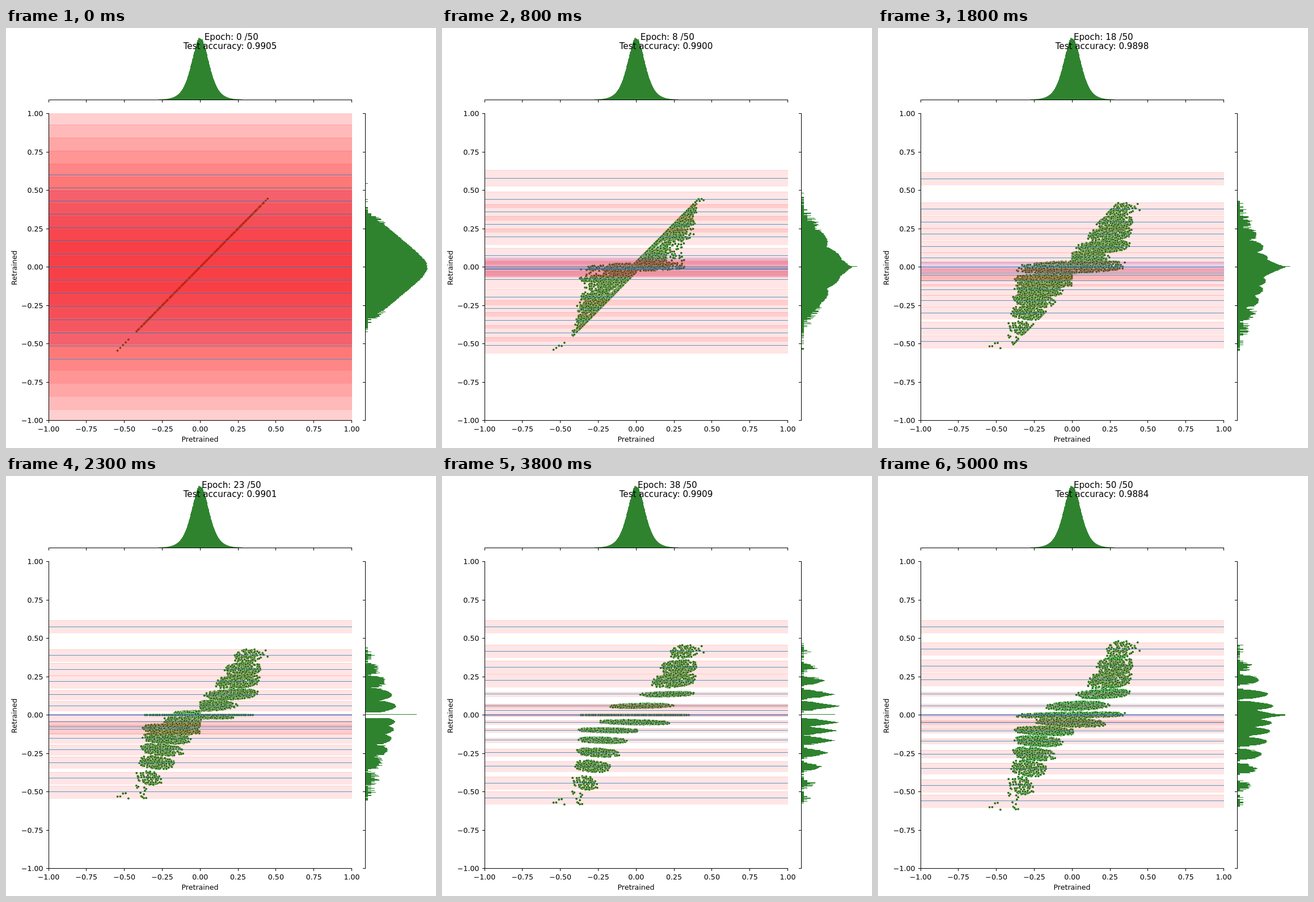
An HTML page with a canvas that plays this animation: 758x739 px, repeating every 5100 ms.

```html
<!DOCTYPE html>
<html lang="en">
<head>
<meta charset="utf-8">
<title>Weight clustering</title>
<style>
html, body { margin: 0; width: 100%; height: 100%; overflow: hidden; background: #fff; }
canvas { display: block; width: 758px; height: 739px; }
</style>
</head>
<body>
<canvas id="plot" width="758" height="739"></canvas>
<script>
const ctx = document.getElementById('plot').getContext('2d');
const STEP = 100, LAST = 50;
const FONT = '"DejaVu Sans", sans-serif';
const GREEN = '#2f832f';
const ZERO = 6, ROAMER = 7, SNAP = 20;

// where the cluster centres end up
const settled = [.575, .43, .32, .23, .137, .06, 0, 0,
  -.049, -.104, -.171, -.254, -.347, -.46, -.561];
// epoch, accuracy
const scores = [[0, 9905], [4, 9903], [14, 9896], [23, 9901], [30, 9906], [38, 9909], [50, 9884]];

const clamp = (v, lo = 0, hi = 1) => Math.min(hi, Math.max(lo, v));
const ramp = (v, a, b) => clamp((v - a) / (b - a));
const mix = (a, b, t) => a + (b - a) * t;
const X = v => 342.25 + 267.25 * v;
const Y = v => 420.5 - 270 * v;

function generator(seed) {
  return () => {
    seed = seed + 0x6D2B79F5 | 0;
    let t = Math.imul(seed ^ seed >>> 15, 1 | seed);
    t = t + Math.imul(t ^ t >>> 7, 61 | t) ^ t;
    return ((t ^ t >>> 14) >>> 0) / 4294967296;
  };
}

// Each cluster gathers weights from a range around its centre.
function makePoints() {
  const rnd = generator(11);
  const list = [];
  const add = (k, x, off) => list.push({
    k, x, lag: rnd(), order: rnd(),
    noise: 1.1 * (2 * rnd() - 1) * Math.sqrt(1 - .85 * off * off) + .3 * off
  });
  settled.forEach((c, k) => {
    if (k === 0 || k === ROAMER) return;
    const size = Math.abs(c), side = c < 0 ? -1 : 1;
    const near = .66 * size - .06 - .32 * Math.exp(-((c / .07) ** 2));
    const far = size > 0 && size < .08 ? .25 : .37 + .12 * size;
    const count = 950 * Math.pow(1 - size / .6, 1.6);
    for (let i = 0; i < count; i++) {
      const off = rnd() + rnd() - 1;
      add(k, side * ((near + far) / 2 + off * (far - near) / 2), off);
    }
  });
  for (let i = 0; i < 5; i++) add(14, -.545 + .018 * i, -.6);
  for (let i = 0; i < 3; i++) add(1, .445 - .013 * i, .6);
  return list.sort((a, b) => a.order - b.order);
}
const points = makePoints();

// An even grid is first drawn towards zero, then settles and spreads outwards.
function center(k, e) {
  const grid = .6 - k * .6 / 7;
  const pulled = grid * mix(.91, .97, ramp(grid, -.2, .6)) * ramp(Math.abs(grid), .09, .25);
  const early = mix(grid, pulled, ramp(e, 0, 4));
  const end = settled[k];
  const shrink = k === 0 ? 0 : end > 0 ? .14 * Math.min(1, end / .43) : .155;
  const late = k === ROAMER
    ? -.025 - .055 * Math.cos(Math.PI * (e - 22) / 17) * ramp(e, 10, 22)
    : end * (1 - shrink * Math.pow((LAST - e) / 36, 1.3));
  return mix(early, late, ramp(e, 4, 14));
}

function halfWidth(k, c, e) {
  if (k === ZERO && e >= SNAP) return .004;
  const early = .04 + .46 * Math.pow(.635, e);
  if (k === ROAMER) return early;
  const late = clamp(Math.abs(c) * .1 + (c > .2 ? .03 : 0), .013, .041);
  return mix(early, late, ramp(e, 14, 38));
}

function clusterState(e) {
  return settled.map((_, k) => {
    const c = center(k, e);
    return { c, h: halfWidth(k, c, e) };
  });
}

function pointY(p, e, state) {
  const { c, h } = state[p.k];
  const widen = .012 * ramp(e, 42, 50);
  const spread = p.k === ZERO && e >= SNAP
    ? 1.3 * widen
    : (Math.min(.042, h) + widen) * clamp(e / 14);
  const side = Math.sign(p.x);
  let goal = (c + spread * p.noise) * side;
  if (goal < 0 && p.k !== ZERO) goal *= ramp(e, 20, 30);
  const reach = e < 14 ? .004 * e : .056 + (e - 14) * .015;
  goal = Math.min(goal, Math.abs(p.x) + reach) * side;
  return mix(p.x, goal, Math.pow(ramp(e, 0, 4 + 12 * p.lag), 1 + p.lag));
}

function dot(x, y, r, color) {
  ctx.fillStyle = color;
  ctx.beginPath();
  ctx.arc(x, y, r, 0, 7);
  ctx.fill();
}

function drawCloud(e, state) {
  for (const p of points) {
    const x = X(p.x), y = Y(pointY(p, e, state));
    dot(x, y, 2.2, '#fff');
    dot(x, y, 1.88, '#0b780b');
  }
}

function drawBand(c, h, color) {
  const top = Math.round(Y(c + h)), bottom = Math.round(Y(c - h));
  ctx.fillStyle = ctx.strokeStyle = color;
  ctx.fillRect(75, top, 535, bottom - top);
  ctx.strokeRect(74.5, top + .5, 536, bottom - top);
}

function drawBands(e, state) {
  ctx.save();
  ctx.beginPath();
  ctx.rect(75, 150, 535, 541);
  ctx.clip();
  ctx.lineWidth = 1;
  drawBand(0, e >= SNAP ? .005 : .03 + .47 * Math.pow(.71, e), 'rgba(0,0,255,.1)');
  for (const { c, h } of state) drawBand(c, h, 'rgba(255,0,0,.1)');
  ctx.fillStyle = 'rgba(31,119,180,.72)';
  for (const { c } of state) ctx.fillRect(75, Math.floor(Y(c)), 535, 1);
  ctx.fillRect(75, 420, 535, 1);
  ctx.restore();
}

function drawTopBars() {
  const rnd = generator(5);
  ctx.fillStyle = GREEN;
  for (let x = 200; x < 485; x++) {
    const f = Math.pow(Math.cosh((x - 342) / 20.5), -2);
    const h = 109 * f + (rnd() - .5) * 4 * f;
    if (h > .3) ctx.fillRect(x, 126 - h, 1, h);
  }
}

const lobe = (y, c, height, w, power) => height * (1 - Math.pow(Math.abs(y - c) / w, power));

// log-scaled count of weights at value y
function sideHeight(y, e, state) {
  const bell = 110 - 48 * Math.log10(Math.cosh(y / .064));
  const whole = mix(bell, 91 - 225 * Math.abs(y), ramp(e, 0, 4));
  const sharp = ramp(e, 28, 38) - ramp(e, 38, 48);
  const power = mix(2.2, 1, sharp);
  const width = .035 + .022 * ramp(38 - e, 0, 20);
  const scale = mix(.8, 1, ramp(e, 20, 32)) + .12 * sharp;
  let best = -30;
  state.forEach(({ c }, k) => {
    if (k === 0 || k === ZERO || k === ROAMER) return;
    const height = c > 0 ? 66 * Math.exp(-((c / .31) ** 2)) : 62 * Math.exp(-((c / .42) ** 2));
    best = Math.max(best, lobe(y, c, height * scale, width + .02 * Math.min(.4, Math.abs(c)), power));
  });
  if (e < SNAP) best = Math.max(best, lobe(y, 0, 86, .13, .9));
  else if (Math.abs(y) < .018 && e < 42) best = -30;
  if (e > 42) best = Math.max(best, lobe(y, 0, 95, .07 * ramp(e, 40, 50), .6));
  return mix(whole, best, ramp(e, 4, SNAP));
}

function drawSideBars(e, state) {
  const rnd = generator(90 + e * 17);
  ctx.fillStyle = GREEN;
  const low = Math.min(-.545, state[14].c - .03);
  const high = Math.max(.43, state[1].c + .055);
  for (let row = 270; row < 600; row++) {
    const y = (420.5 - row) / 270;
    const h = sideHeight(y, e, state);
    const r = rnd(), luck = rnd();
    let len = h + (r - .5) * (h < 32 ? 13 : 2);
    if (len < 6) {
      const chance = e < SNAP ? Math.exp((h - 5) / 14) : h > -15 ? .3 : .1;
      const gap = e >= SNAP && Math.abs(y) < .02;
      len = !gap && y > low && y < high && luck < chance ? 5 : 0;
    } else if (len < 16) {
      len = len < 11 ? 5 : 11;
    }
    if (len) ctx.fillRect(633, row, len, 1);
  }
  const spike = 101 - 31 * ramp(e, 30, 38) + 25 * ramp(e, 38, 50) - 10 * ramp(e, 4, 23);
  if (e > 0) ctx.fillRect(633, 419, spike, 1);
}

function label(text, x, y, size, align = 'center') {
  ctx.font = size + 'px ' + FONT;
  ctx.textAlign = align;
  ctx.fillText(text, x, y);
}

function drawAxes() {
  const size = 12.6;
  ctx.fillStyle = '#000';
  ctx.fillRect(75, 150, 1, 541);
  ctx.fillRect(75, 690, 535, 1);
  ctx.fillRect(75, 126, 535, 1);
  ctx.fillRect(633, 150, 1, 541);
  for (let i = -4; i <= 4; i++) {
    const v = i / 4, x = Math.floor(X(v)), y = Math.floor(Y(v));
    const text = (v < 0 ? '\u2212' : '') + Math.abs(v).toFixed(2);
    ctx.fillRect(x, 691, 1, 4);
    ctx.fillRect(x, 127, 1, 4);
    ctx.fillRect(71, y, 4, 1);
    ctx.fillRect(629, y, 4, 1);
    label(text, X(v), 710, size);
    label(text, 65.5, y + 5, size, 'right');
  }
  label('Pretrained', 342, 728, size);
  ctx.save();
  ctx.translate(19, 422);
  ctx.rotate(-Math.PI / 2);
  label('Retrained', 0, 0, size);
  ctx.restore();
}

function accuracy(e) {
  const i = Math.max(1, scores.findIndex(([at]) => at >= e));
  const [a, from] = scores[i - 1], [b, to] = scores[i];
  return '0.' + Math.round(mix(from, to, ramp(e, a, b)));
}

function drawTitle(e) {
  ctx.fillStyle = '#000';
  label(`Epoch: ${e} /50`, 397.3, 21, 15.15);
  label('Test accuracy: ' + accuracy(e), 395, 37, 15.15);
}

function draw(e) {
  const state = clusterState(e);
  ctx.fillStyle = '#fff';
  ctx.fillRect(0, 0, 758, 739);
  drawCloud(e, state);
  drawBands(e, state);
  drawTopBars();
  drawSideBars(e, state);
  drawAxes();
  drawTitle(e);
}

let shown = -1;
const start = performance.now();
function tick() {
  const e = Math.floor((performance.now() - start) / STEP) % (LAST + 1);
  if (e !== shown) draw(shown = e);
  requestAnimationFrame(tick);
}
tick();
</script>
</body>
</html>
```
